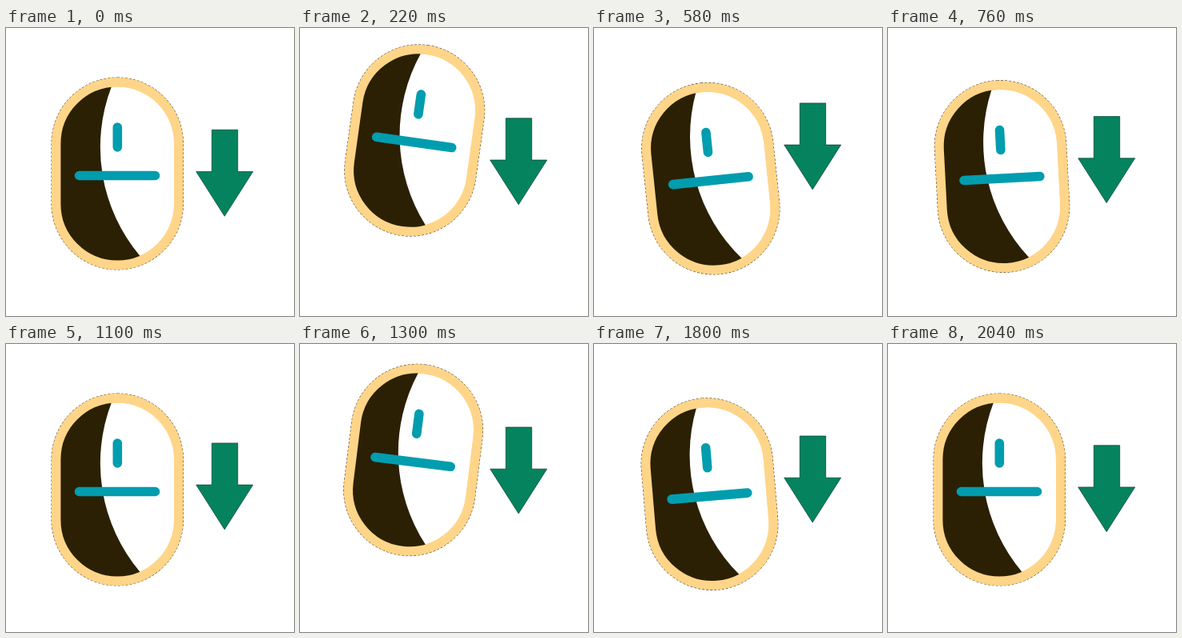
Recreate the animation shown at these times as an HTML page. Size 360x360 px, loop 2.12 s.

```html
<!DOCTYPE html>
<html lang="en">
<head>
<meta charset="utf-8">
<title>Scroll down</title>
<style>
  html, body { margin: 0; width: 100%; height: 100%; overflow: hidden; background: #fff; }
  svg { display: block; width: 100vw; height: 100vh; }
</style>
</head>
<body>
<svg viewBox="0 0 360 360">
  <defs>
    <clipPath id="shell"><rect x="63" y="68" width="153" height="228" rx="76.5"/></clipPath>
  </defs>
  <g id="mouse">
    <rect x="57" y="62" width="164.5" height="240" rx="82.25" fill="#ffd589" stroke="#2b2003" stroke-width=".8" stroke-dasharray="3 2"/>
    <rect x="68.5" y="73.5" width="141.5" height="217" rx="70.75" fill="#fff"/>
    <g clip-path="url(#shell)">
      <path d="M132 73A211 211 0 0 0 167.5 285L139 320H40V60H135Z" fill="#2b2003"/>
    </g>
    <rect x="62.75" y="67.75" width="153" height="228.5" rx="76.5" fill="none" stroke="#ffd589" stroke-width="11.3"/>
    <path d="M139.3 124V149M91.5 184.5H186.5" stroke="#009dae" stroke-width="11.6" stroke-linecap="round"/>
  </g>
  <path id="arrow" d="M257.3 127.3H289.7V179.5H308.7L273.2 235.3L237.7 179.5H257.3Z" fill="#05835f" stroke="#0b3b2c" stroke-width=".7"/>
</svg>
<script>
  const LOOP = 2120, HOLD_FROM = 2040;
  const MOUSE_PERIOD = 1100, ARROW_PERIOD = 1000, ARROW_RISE = 35.6;

  // bow: how far the path to this pose curves to the left
  const poses = [
    { at: 5, x: 0, y: 0, tilt: 0, bow: 0 },
    { at: 305, x: 7.5, y: -51, tilt: 9.8, bow: 4.5 },
    { at: 605, x: 7, y: 7.2, tilt: -6.2, bow: 2.7 },
    { at: 910, x: 0, y: 0, tilt: 0, bow: 0 }
  ];

  const mouse = document.getElementById('mouse');
  const arrow = document.getElementById('arrow');
  const ease = p => (1 - Math.cos(Math.PI * p)) / 2;
  const mix = (a, b, k) => a + (b - a) * k;

  function poseAt(t) {
    const next = poses.findIndex(pose => pose.at > t);
    if (next < 1) return poses[0];
    const a = poses[next - 1], b = poses[next];
    const k = ease((t - a.at) / (b.at - a.at));
    return {
      x: mix(a.x, b.x, k) - b.bow * Math.sin(Math.PI * k),
      y: mix(a.y, b.y, k),
      tilt: mix(a.tilt, b.tilt, k)
    };
  }

  function render(time) {
    const t = Math.min(time % LOOP, HOLD_FROM);
    const { x, y, tilt } = poseAt(t % MOUSE_PERIOD);
    mouse.setAttribute('transform', `translate(${x} ${y}) rotate(${tilt} 139 184.5)`);
    const lift = ARROW_RISE * ease(2 * t / ARROW_PERIOD);
    arrow.setAttribute('transform', `translate(0 ${-lift})`);
  }

  let start;
  function tick(now) {
    start ??= now;
    render(now - start);
    requestAnimationFrame(tick);
  }
  render(0);
  requestAnimationFrame(tick);
</script>
</body>
</html>
```
